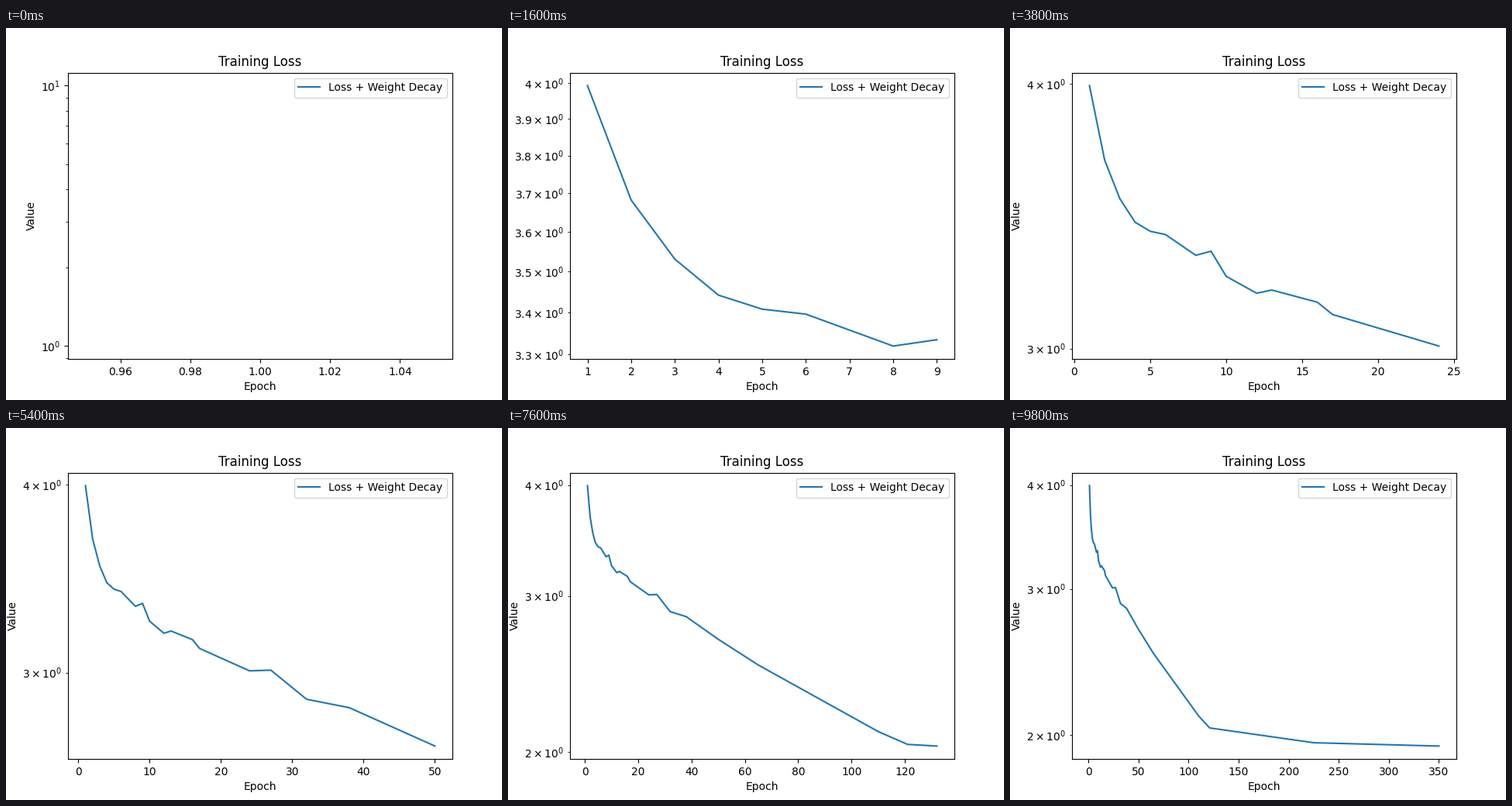
Write a matplotlib script that moves like this. It is 640 by 480 pixels and loops after 10 s.

```python
import numpy as np
import matplotlib.pyplot as plt
from matplotlib.animation import FuncAnimation

# Bends of the loss curve as (epoch, loss); log loss is straight in between
BENDS = [
    (1, 3.993), (2, 3.682), (3, 3.531), (4, 3.442), (5, 3.408), (6, 3.396),
    (8, 3.320), (9, 3.335), (10, 3.245), (12, 3.186), (13, 3.197), (16, 3.155),
    (17, 3.113), (24, 3.008), (27, 3.011), (32, 2.880), (38, 2.843), (50, 2.681),
    (65, 2.508), (110, 2.110), (121, 2.041), (225, 1.959), (350, 1.941),
]

bend_epochs, bend_loss = np.array(BENDS).T

# Log-spaced checkpoints: 50 distinct epochs from 1 to 350
epochs = np.unique(np.round(np.geomspace(1, 350, 67)).astype(int))
loss = np.exp(np.interp(epochs, bend_epochs, np.log(bend_loss)))

fig, ax = plt.subplots(figsize=(6.4, 4.8), dpi=100)


def draw(i):
    ax.clear()
    ax.semilogy(epochs[:i + 1], loss[:i + 1], label="Loss + Weight Decay")
    ax.set_title("Training Loss")
    ax.set_xlabel("Epoch")
    ax.set_ylabel("Value")
    ax.legend(loc="upper right")


anim = FuncAnimation(fig, draw, frames=len(epochs), init_func=lambda: draw(0),
                     interval=200, repeat=True, repeat_delay=0)
plt.show()
```
